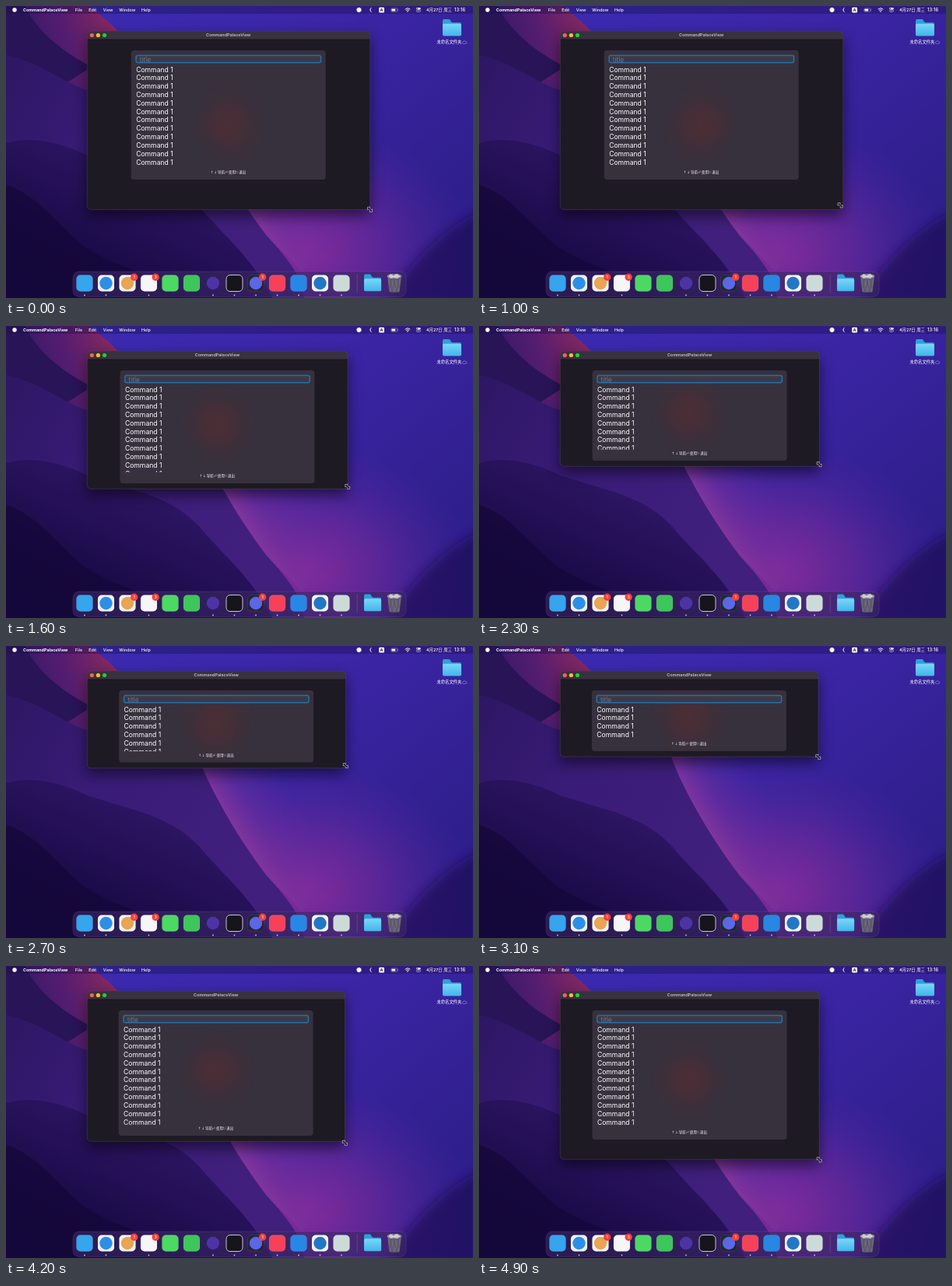
An HTML page for the animation above (5 s loop, 600 by 375 pixels).

```html
<!DOCTYPE html>
<html lang="en">
<head>
<meta charset="utf-8">
<title>Resizable command window</title>
<style>
html, body { margin: 0; width: 100%; height: 100%; overflow: hidden; background: #140a38; }
svg { display: block; width: 100vw; height: 100vh; }
text { font-family: Inter, "Noto Sans CJK SC", "Noto Sans", sans-serif; fill: #fff; }
.bold { font-weight: 700; font-size: 5.4px; }
.menu { font-weight: 500; font-size: 5.4px; }
.row { font-weight: 400; font-size: 8.6px; }
.hint { font-size: 4.5px; font-weight: 500; fill: #f4f2f6; font-family: "DejaVu Sans", "Noto Sans CJK SC", sans-serif; }
.mid { text-anchor: middle; }
</style>
</head>
<body>
<svg viewBox="0 0 600 375" preserveAspectRatio="none">
  <defs>
    <linearGradient id="sky" x1=".2" y1="0" x2="1" y2=".6">
      <stop offset="0" stop-color="#3a2bb0"/><stop offset=".45" stop-color="#3c25a6"/>
      <stop offset="1" stop-color="#2f1f8c"/>
    </linearGradient>
    <linearGradient id="crest" gradientUnits="userSpaceOnUse" x1="20" y1="45" x2="135" y2="15">
      <stop offset="0" stop-color="#35186a"/><stop offset=".5" stop-color="#561d70"/><stop offset="1" stop-color="#85285f"/>
    </linearGradient>
    <linearGradient id="hill" gradientUnits="userSpaceOnUse" x1="0" y1="90" x2="330" y2="270">
      <stop offset="0" stop-color="#2f1765"/><stop offset=".4" stop-color="#391c78"/><stop offset="1" stop-color="#40207c"/>
    </linearGradient>
    <linearGradient id="front" gradientUnits="userSpaceOnUse" x1="200" y1="190" x2="120" y2="360">
      <stop offset="0" stop-color="#301767"/><stop offset=".5" stop-color="#241056"/><stop offset="1" stop-color="#150840"/>
    </linearGradient>
    <linearGradient id="ridge" gradientUnits="userSpaceOnUse" x1="295" y1="240" x2="375" y2="194">
      <stop offset="0" stop-color="#8f3a9c" stop-opacity=".8"/><stop offset=".35" stop-color="#75309c" stop-opacity=".5"/>
      <stop offset="1" stop-color="#5a2aa4" stop-opacity="0"/>
    </linearGradient>
    <radialGradient id="haze">
      <stop offset="0" stop-color="#8a2c9a" stop-opacity=".95"/><stop offset=".45" stop-color="#702a9c" stop-opacity=".65"/>
      <stop offset="1" stop-color="#5027a0" stop-opacity="0"/>
    </radialGradient>
    <radialGradient id="glow">
      <stop offset="0" stop-color="#6a2a2c" stop-opacity=".42"/><stop offset=".46" stop-color="#62282c" stop-opacity=".32"/>
      <stop offset=".5" stop-color="#5e282e" stop-opacity=".22"/><stop offset="1" stop-color="#5a2830" stop-opacity="0"/>
    </radialGradient>
    <linearGradient id="folder" x1="0" y1="0" x2="0" y2="1">
      <stop offset="0" stop-color="#7ad7fa"/><stop offset="1" stop-color="#43b4ea"/>
    </linearGradient>
    <filter id="soft" x="-20%" y="-20%" width="140%" height="140%"><feGaussianBlur stdDeviation=".7"/></filter>
    <filter id="mist" x="-30%" y="-30%" width="160%" height="160%"><feGaussianBlur stdDeviation="7"/></filter>
    <filter id="shade" x="-20%" y="-30%" width="140%" height="170%"><feGaussianBlur stdDeviation="9"/></filter>
    <clipPath id="palClip"><rect id="palCut" x="161" y="57" width="250" height="166" rx="4"/></clipPath>
    <clipPath id="listClip"><rect id="listCut" x="161" y="74" width="250" height="135"/></clipPath>
    <clipPath id="fieldClip"><rect x="168" y="64" width="236" height="8.2"/></clipPath>
    <g id="dir">
      <path d="M0 2H9Q10 2 11 3.2L12 4.5H22Q24 4.5 24 6.5V20Q24 22 22 22H2Q0 22 0 20V2Q0 0 2 0H8Q9.5 0 10.5 2Z" fill="#2f9fdc"/>
      <rect y="6" width="24" height="16.5" rx="1.8" fill="url(#folder)"/>
    </g>
  </defs>

  <g id="wallpaper">
    <rect width="600" height="375" fill="url(#sky)"/>
    <ellipse cx="385" cy="315" rx="215" ry="165" fill="url(#haze)"/>
    <path d="M610 262C565 285 520 325 485 385H610Z" fill="#1d0d55" opacity=".7" filter="url(#mist)"/>
    <g filter="url(#soft)">
      <path d="M240 130C262 185 300 250 335 295L380 340L440 290L330 100Z" fill="url(#ridge)"/>
      <path d="M-5 -5H100C125 14 145 28 165 60L247 142H-5Z" fill="url(#crest)"/>
      <path d="M-5 -5H22C34 25 65 55 110 78L60 110L-5 90Z" fill="#2a1458"/>
      <path d="M-5 62C40 70 72 98 104 108L200 80L247 142C262 185 300 250 335 295C350 312 362 324 374 345L385 380H-5Z" fill="url(#hill)"/>
      <path d="M-5 178C30 165 70 175 105 192C165 212 215 218 252 262C285 300 318 325 345 380H-5Z" fill="url(#front)"/>
      <path d="M-5 228C40 240 65 282 105 312C145 338 195 342 230 380H-5Z" fill="#140738" opacity=".75"/>
    </g>
  </g>

  <g id="bar">
    <rect width="600" height="10" fill="#1d1050" opacity=".4"/>
    <circle cx="11" cy="5" r="2.7" fill="#fff"/>
    <text class="bold" x="22" y="6.9">CommandPalaceView</text>
    <circle cx="453.5" cy="5" r="2.7" fill="#fff" stroke="#fff" stroke-width=".8"/>
    <path d="M469.6 2.2A3 3 0 0 0 469.6 7.8A3.4 3.4 0 0 1 469.6 2.2Z" fill="#fff" stroke="#fff" stroke-width=".4"/>
    <rect x="479.2" y="1.7" width="6.8" height="6.8" rx="1.2" fill="#fff"/>
    <text class="bold mid" x="482.6" y="7" style="fill:#30206c">A</text>
    <rect x="494.8" y="3" width="8.2" height="4.3" rx="1.2" fill="none" stroke="#fff" stroke-opacity=".65" stroke-width=".5"/>
    <rect x="495.6" y="3.8" width="4.6" height="2.7" rx=".5" fill="#fff"/>
    <rect x="503.5" y="4.4" width=".6" height="1.5" fill="#fff" opacity=".7"/>
    <path d="M512.7 4.1Q516 1.3 519.3 4.1M513.9 5.6Q516 3.9 518.1 5.6" fill="none" stroke="#fff" stroke-width=".9"/>
    <circle cx="516" cy="7" r=".8" fill="#fff"/>
    <rect x="527.2" y="2.3" width="5.6" height="2.3" rx="1.15" fill="#fff"/>
    <circle cx="528.5" cy="3.4" r=".7" fill="#30206c"/>
    <rect x="527.4" y="5.4" width="5.2" height="2" rx="1" fill="none" stroke="#fff" stroke-width=".5"/>
    <text class="menu" x="540" y="6.9">4月27日 周三</text>
    <text class="menu" x="576" y="6.9" style="font-size:6px">13:16</text>
  </g>

  <use href="#dir" transform="translate(561 17) scale(1 .95)"/>
  <text x="553.5" y="48.4" style="font-size:5.3px;font-weight:500">未命名文件夹</text>
  <path d="M587.4 48.4A1.2 1.2 0 0 1 587.3 46A1.7 1.7 0 0 1 590.5 45.8A1.3 1.3 0 0 1 590.7 48.4Z" fill="none" stroke="#b3acd0" stroke-width=".5"/>

  <g id="dock">
    <rect x="86" y="341" width="428" height="32.5" rx="8" fill="#3a2865" fill-opacity=".62" stroke="#8f80b5" stroke-opacity=".35" stroke-width=".5"/>
    <rect x="450.8" y="345" width=".6" height="23" fill="#a195bd" opacity=".45"/>
  </g>

  <g id="win">
    <rect id="shadow" x="104" y="40" fill="#000" opacity=".55" filter="url(#shade)"/>
    <rect id="frame" x="104.25" y="32.25" rx="5" fill="#1d1a23"/>
    <path id="head" fill="#37323d"/>
    <rect id="rule" x="104.5" y="42.7" height=".5" fill="#0f0d13"/>
    <rect id="edge" x="104.25" y="32.25" rx="5" fill="none" stroke="#77717f" stroke-opacity=".55" stroke-width=".5"/>
    <circle cx="110.3" cy="37.5" r="2.6" fill="#ff5f57"/>
    <circle cx="118.4" cy="37.5" r="2.6" fill="#febc2e"/>
    <circle cx="126.5" cy="37.5" r="2.6" fill="#28c840"/>
    <g id="inner">
      <text class="bold mid" x="286" y="39.4" style="fill:#b8b3bd">CommandPalaceView</text>
      <rect id="pal" x="161" y="57" width="250" height="166" rx="4" fill="#36313d"/>
      <g clip-path="url(#palClip)"><circle id="lamp" cx="286" cy="152" r="54" fill="url(#glow)"/></g>
      <rect x="167.4" y="63.6" width="237.4" height="9.2" rx="2.2" fill="#3d3943" stroke="#2270ae" stroke-width="1.5"/>
      <g clip-path="url(#fieldClip)"><text x="172" y="71.6" style="font-size:8.3px;fill:#77727e">title</text></g>
      <g id="list" clip-path="url(#listClip)"></g>
      <text id="hint" class="hint"><tspan x="263">↑</tspan><tspan x="267.6">↓</tspan><tspan x="272.3">导航</tspan><tspan x="281.2">⏎</tspan><tspan x="286.3">使用</tspan><tspan x="295">⎋</tspan><tspan x="299.6">退出</tspan></text>
    </g>
  </g>

  <g id="cursor">
    <path d="M-3 -3H.4L-.6 -1.9L1.9 .6L3 -.4V3H-.4L.6 1.9L-1.9 -.6L-3 .4Z" fill="#0b0910" stroke="#e6e4ea" stroke-width=".6"/>
  </g>
</svg>

<script>
const $ = id => document.getElementById(id);
const add = (parent, tag, attrs, text) => {
  const el = document.createElementNS("http://www.w3.org/2000/svg", tag);
  for (const k in attrs) el.setAttribute(k, attrs[k]);
  if (text) el.textContent = text;
  parent.append(el);
};
const set = (id, attrs) => {
  for (const k in attrs) $(id).setAttribute(k, attrs[k]);
};

const menus = { File: 89, Edit: 106.3, View: 124.8, Window: 145.2, Help: 174 };
for (const name in menus) add($("bar"), "text", { class: "menu", x: menus[name], y: 6.9 }, name);

for (let i = 0; i < 12; i++)
  add($("list"), "text", { class: "row", x: 167.4, y: 84.5 + i * 10.82 }, "Command 1");

// tile colour, disc colour, running, badge
const apps = [
  ["#35a5ee", "", 1], ["#eef1f4", "#2b8fe8", 1], ["#f5f4f2", "#e8a552", 0, "1"],
  ["#f6f5f7", "", 1, "3"], ["#4bd964", "", 0], ["#3ec65a", "", 0],
  ["", "#4b35a5", 1], ["#16151b", "", 1], ["#24262f", "#5a68e8", 1, "1"],
  ["#f5425a", "", 1], ["#2787e2", "", 1], ["#f2f4f7", "#2277c5", 1], ["#cddbd8", "", 1]
];
const dock = $("dock");
apps.forEach(([tile, disc, running, badge], i) => {
  const x = 101 + i * 27.5, dark = tile == "#16151b";
  if (tile) add(dock, "rect", { x: x - 10.5, y: 345.5, width: 21, height: 21, rx: 5, fill: tile,
    stroke: dark ? "#c9c7ce" : "#fff", "stroke-opacity": dark ? 1 : .2, "stroke-width": dark ? 1 : .4 });
  if (disc) add(dock, "circle", { cx: x, cy: 356, r: 8.2, fill: disc });
  if (running) add(dock, "circle", { cx: x, cy: 371.3, r: .9, fill: "#d8d2e2" });
  if (badge) {
    add(dock, "circle", { cx: x + 8.7, cy: 348.3, r: 4.7, fill: "#f4403c" });
    add(dock, "text", { class: "mid menu", x: x + 8.7, y: 350.4 }, badge);
  }
});
add(dock, "use", { href: "#dir", transform: "translate(460 344.5) scale(.92 .97)" });
add(dock, "path", { d: "M490 346.5H508L505.7 366Q505.5 367.5 503.5 367.5H494.5Q492.5 367.5 492.3 366Z", fill: "#75727e", "fill-opacity": .85 });
add(dock, "path", { d: "M493 348L496 367M497 348L502 367M502 348L505 363M505 348L502 367M501 348L496 367M496 348L493 363", stroke: "#4f4b5c", "stroke-width": .7 });
add(dock, "path", { d: "M491 347L494 344L498 346L502 343.8L507 347L503 350L498 349L494 350Z", fill: "#d0ced4" });
add(dock, "ellipse", { cx: 499, cy: 346.8, rx: 9.1, ry: 2.2, fill: "none", stroke: "#b3b0bb", "stroke-width": .8 });

// dragged corner: time, right, bottom
const steps = [
  [1000, 467.5, 261.3], [1600, 439, 209], [2300, 437.2, 180],
  [3100, 435.8, 142], [4200, 435.3, 225], [4900, 437, 248]
];
const last = steps.length - 1;
const LEAD = 50; // the window trails the pointer by this much
const span = i => steps[i + 1][0] - steps[i][0];
const slope = (i, c) => (steps[i + 1][c] - steps[i][c]) / span(i);

function tangent(i, c) {
  if (i == 0 || i == last) {
    const a = i ? last - 1 : 0, b = i ? last - 2 : 1;
    return slope(a, c) + (slope(a, c) - slope(b, c)) * span(a) / (span(a) + span(b));
  }
  const a = slope(i - 1, c), b = slope(i, c);
  return a * b <= 0 ? 0 : 2 * a * b / (a + b);
}

// smooth curve through the steps, at rest before the first
function at(t, c) {
  t = Math.max(t, steps[0][0]);
  let i = 0;
  while (i < last - 1 && t >= steps[i + 1][0]) i++;
  const p = steps[i], q = steps[i + 1], h = span(i), u = (t - p[0]) / h;
  return p[c] + (q[c] - p[c]) * u * u * (3 - 2 * u) +
    h * u * (1 - u) * ((1 - u) * tangent(i, c) - u * tangent(i + 1, c));
}

function draw(t) {
  const right = at(t, 1), bottom = at(t, 2), w = right - 104, h = bottom - 32;
  const palEnd = Math.min(223, bottom - 7);
  for (const id of ["shadow", "frame", "edge"]) set(id, { width: w, height: h });
  set("rule", { width: w - .5 });
  set("head", { d: `M104.5 43V37Q104.5 32.5 109 32.5H${right - 4.5}Q${right} 32.5 ${right} 37V43Z` });
  set("inner", { transform: `translate(${(104 + right) / 2 - 286} 0)` });
  set("pal", { height: palEnd - 57 });
  set("palCut", { height: palEnd - 57 });
  set("listCut", { height: palEnd - 14.3 - 74 });
  set("lamp", { cy: (43 + bottom) / 2 });
  set("hint", { y: palEnd - 7.8 });
  set("cursor", { transform: `translate(${at(t + LEAD, 1)} ${at(t + LEAD, 2)})` });
}

const start = performance.now();
function tick() {
  const t = (performance.now() - start) % 5000;
  draw(Math.floor(t / 100) * 100);
  requestAnimationFrame(tick);
}
tick();
</script>
</body>
</html>
```
